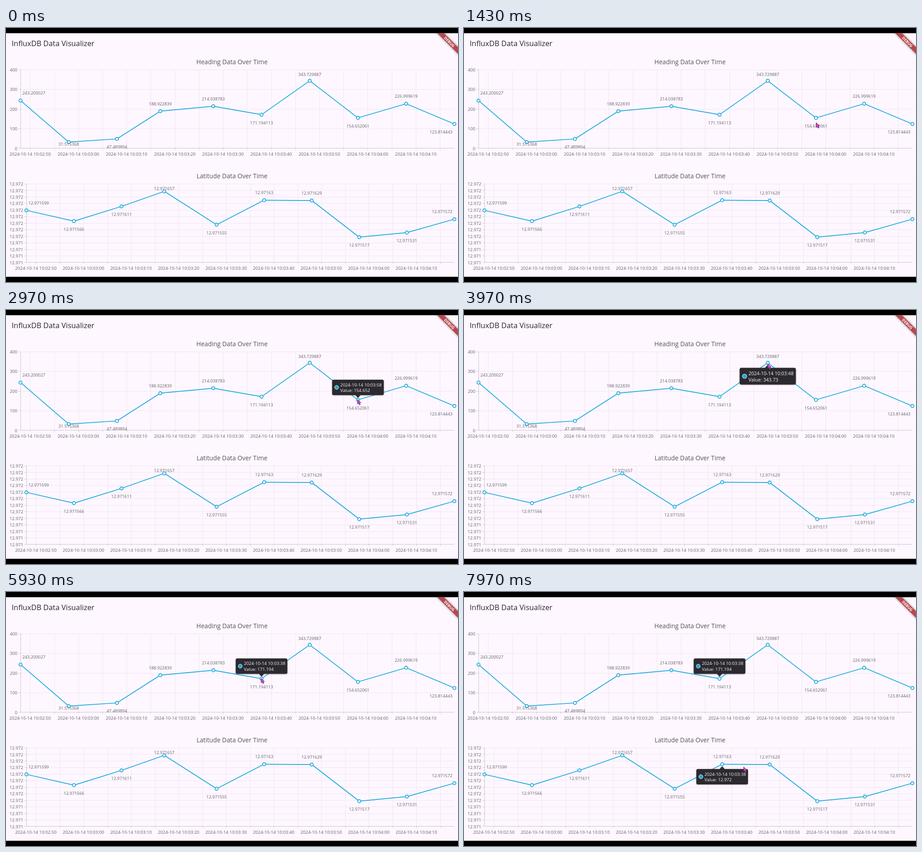
Animation, 998 px wide and 561 px high, one loop 8 s. Source, as an HTML page with a canvas:

```html
<!DOCTYPE html>
<html lang="en">
<head>
<meta charset="utf-8">
<title>InfluxDB Data Visualizer</title>
<style>
html, body { margin: 0; width: 100%; height: 100%; overflow: hidden; background: #000; }
canvas { display: block; width: 998px; height: 561px; }
</style>
</head>
<body>
<canvas id="stage"></canvas>
<script>
const W = 998, H = 561, LOOP = 8000;
const PAGE_TOP = 11.5, PAGE_H = 538, RIGHT = 990;
const FONT = '"Open Sans", "Noto Sans", sans-serif';
const BLUE = '#14a8dc', PAPER = '#fef7ff', MUTED = '#65616a', GRID = '#eee6f2', AXIS = '#cbc4d1';
const canvas = document.getElementById('stage');
const ctx = canvas.getContext('2d');
const dpr = window.devicePixelRatio || 1;
canvas.width = W * dpr;
canvas.height = H * dpr;

const heading = {
  title: 'Heading Data Over Time', left: 32, top: 92, labelWidth: 51,
  max: 400, min: 0, rows: 4, decimals: 0,
  values: [243.200027, 31.515368, 47.489894, 188.922839, 214.038783,
           171.194113, 343.729887, 154.652061, 226.999619, 123.814443]
};
const latitude = {
  title: 'Latitude Data Over Time', left: 45, top: 344, labelWidth: 46,
  max: 12.97168, min: 12.97144, rows: 12, decimals: 3,
  values: [599, 566, 611, 657, 555, 630, 629, 517, 531, 572]
    .map(micro => +(12.971 + micro / 1e6).toFixed(6))
};
const charts = [heading, latitude];
const PLOT_H = 173.4;

// One reading every ten seconds; the fourth came a second early
const secondsAt = i => i === 3 ? 29 : i * 10;
const xAt = (chart, s) => chart.left + s * (RIGHT - chart.left) / 90;

for (const chart of charts) {
  chart.bottom = chart.top + PLOT_H;
  chart.points = chart.values.map((v, i) => ({
    x: xAt(chart, secondsAt(i)),
    y: chart.top + 0.2 + PLOT_H * (chart.max - v) / (chart.max - chart.min)
  }));
}

function stamp(s) {
  const pad = n => String(n).padStart(2, '0');
  const total = 168 + s;
  return `2024-10-14 10:${pad(Math.floor(total / 60))}:${pad(total % 60)}`;
}

const clamp = (v, lo, hi) => Math.max(lo, Math.min(hi, v));

// y is the middle of the capitals
function text(str, x, y, size, color, align = 'center', weight = 400) {
  ctx.font = `${weight} ${size}px ${FONT}`;
  ctx.textAlign = align;
  ctx.fillStyle = color;
  ctx.fillText(str, x, y + size * 0.357);
}

function rect(x, y, w, h, color) {
  ctx.fillStyle = color;
  ctx.fillRect(x, y, w, h);
}

function dot(x, y, r, fill, stroke, width) {
  ctx.beginPath();
  ctx.arc(x, y, r, 0, Math.PI * 2);
  ctx.fillStyle = fill;
  ctx.fill();
  ctx.strokeStyle = stroke;
  ctx.lineWidth = width;
  ctx.stroke();
}

function drawAxes({ left, top, bottom, max, min, rows, decimals }, chart) {
  const base = Math.round(bottom);
  for (let i = 0; i <= rows; i++) {
    const y = top + PLOT_H * i / rows;
    const value = max - (max - min) * i / rows;
    rect(left, Math.round(y), RIGHT - left, 1, GRID);
    rect(left - 4, Math.round(y), 4, 1, AXIS);
    // Shrinking a hair makes exact halves round down
    text((value * (1 - 1e-9)).toFixed(decimals), left - 7, y + 0.7, 9.6, MUTED, 'right');
  }
  for (let s = 2; s < 90; s += 5) {
    const x = xAt(chart, s);
    rect(Math.round(x), top, 1, base - top, GRID);
    rect(Math.round(x), base, 1, 4, AXIS);
    if (s % 10 === 2) text(stamp(s), x, bottom + 13.4, 9.7, MUTED);
  }
  rect(left, top, 1, base - top, AXIS);
  rect(left, base, RIGHT - left, 1, AXIS);
}

// Labels sit above points that rise over their neighbours, else below
function labelSpot({ values, points, left, top, bottom, labelWidth }, i) {
  const near = [values[i - 1], values[i + 1]].filter(v => v !== undefined);
  const mean = near.reduce((a, b) => a + b) / near.length;
  const half = labelWidth / 2 + 4;
  let y = points[i].y + (values[i] > mean ? -16.5 : 18);
  if (y > bottom) y = bottom - 9;
  return [clamp(points[i].x, left + half, RIGHT - half), Math.max(y, top + 11)];
}

function drawSeries(chart) {
  ctx.beginPath();
  chart.points.forEach(p => ctx.lineTo(p.x, p.y));
  ctx.strokeStyle = BLUE;
  ctx.lineWidth = 1.7;
  ctx.lineJoin = 'round';
  ctx.stroke();
  chart.points.forEach(p => dot(p.x, p.y, 3.4, '#fff', BLUE, 1.7));

  ctx.save();
  ctx.beginPath();
  ctx.rect(chart.left, chart.top, RIGHT - chart.left, PLOT_H);
  ctx.clip();
  chart.values.forEach((v, i) => text(String(v), ...labelSpot(chart, i), 9.4, MUTED));
  ctx.restore();
}

function drawBanner() {
  ctx.save();
  ctx.beginPath();
  ctx.rect(0, PAGE_TOP, W, PAGE_H);
  ctx.clip();
  ctx.translate(W, PAGE_TOP);
  ctx.rotate(Math.PI / 4);
  ctx.shadowColor = 'rgba(0,0,0,0.5)';
  ctx.shadowBlur = 5 * dpr;
  rect(-50, 22, 100, 10.2, '#b8484d');
  ctx.shadowColor = 'transparent';
  text('DEBUG', 0, 27.1, 8.4, '#fff', 'center', 700);
  ctx.restore();
}

function easeOutBack(p) {
  const c = 1.70158, q = p - 1;
  return 1 + (c + 1) * q ** 3 + c * q ** 2;
}

const tips = [
  { chart: heading, i: 7, from: 1900, to: 3795, dir: -1 },
  { chart: heading, i: 6, from: 3795, to: 5300, dir: 1 },
  { chart: heading, i: 5, from: 5300, to: LOOP, dir: -1 },
  { chart: latitude, i: 5, from: 7150, to: LOOP, dir: 1 }
];

function drawTip({ chart, i, from, to, dir }, t) {
  if (t < from || t >= to) return;
  const point = chart.points[i];
  const scale = easeOutBack(Math.min(1, (t - from) / 350));
  const top = dir > 0 ? 6 : -40;
  const line = (str, y) => text(str, -39, top + y, 9.7, '#f8f3fa', 'left');
  ctx.save();
  ctx.translate(point.x, point.y + dir * 4.6);
  ctx.scale(scale, scale);
  ctx.beginPath();
  ctx.roundRect(-57, top, 114, 34, 3.5);
  ctx.moveTo(0, 0);
  ctx.lineTo(dir * 6, dir * 6.5);
  ctx.lineTo(-dir * 6, dir * 6.5);
  ctx.closePath();
  ctx.shadowColor = 'rgba(0,0,0,0.4)';
  ctx.shadowBlur = 3 * dpr;
  ctx.shadowOffsetY = 0.6 * dpr;
  ctx.fillStyle = '#2c2a2e';
  ctx.fill();
  ctx.shadowColor = 'transparent';
  dot(-47, top + 17, 4.4, BLUE, '#f5eff7', 1);
  line(stamp(secondsAt(i)), 11.2);
  line('Value: ' + Number(chart.values[i].toFixed(3)), 24);
  ctx.restore();
}

// The pointer rests just beside each point it visits
const near = (arrive, leave, { x, y }, dx = -1.5, dy = -1.5) =>
  ({ arrive, leave, x: x + dx, y: y + dy });
const stops = [
  near(250, 250, { x: 850, y: 566 }),
  near(1400, 1650, heading.points[7], 0, 10),
  near(1850, 3250, heading.points[7]),
  near(3740, 4300, heading.points[6], -0.5, 1.5),
  near(5200, 6250, heading.points[5]),
  near(7050, 7500, latitude.points[5]),
  near(7970, LOOP, latitude.points[5], 47, 5.5)
];

function drawPointer(t) {
  if (t < stops[0].arrive) return;
  const k = stops.findLastIndex(s => t >= s.arrive);
  const a = stops[k], b = stops[k + 1] || a;
  const p = clamp((t - a.leave) / (b.arrive - a.leave), 0, 1);
  const e = p * p * (3 - 2 * p);
  ctx.save();
  ctx.translate(a.x + (b.x - a.x) * e, a.y + (b.y - a.y) * e);
  const arrow = new Path2D('M.5 .5V10.8L2.9 8.7L4.7 12.6L6.6 11.8L4.9 8L8 7.8Z');
  ctx.fillStyle = '#e23fd6';
  ctx.strokeStyle = '#5b2359';
  ctx.lineWidth = 0.9;
  ctx.fill(arrow);
  ctx.stroke(arrow);
  ctx.restore();
}

function draw(t) {
  ctx.setTransform(dpr, 0, 0, dpr, 0, 0);
  rect(0, 0, W, H, '#000');
  rect(0, PAGE_TOP, W, PAGE_H, PAPER);
  text('InfluxDB Data Visualizer', 12.5, 34.6, 16.4, '#2a272d', 'left');
  for (const chart of charts) {
    text(chart.title, 499, chart.top - 17.4, 13.8, '#56525b');
    drawAxes(chart, chart);
    drawSeries(chart);
  }
  drawBanner();
  tips.forEach(tip => drawTip(tip, t));
  drawPointer(t);
}

const start = performance.now();
function tick() {
  draw((performance.now() - start) % LOOP);
  requestAnimationFrame(tick);
}
tick();
</script>
</body>
</html>
```
